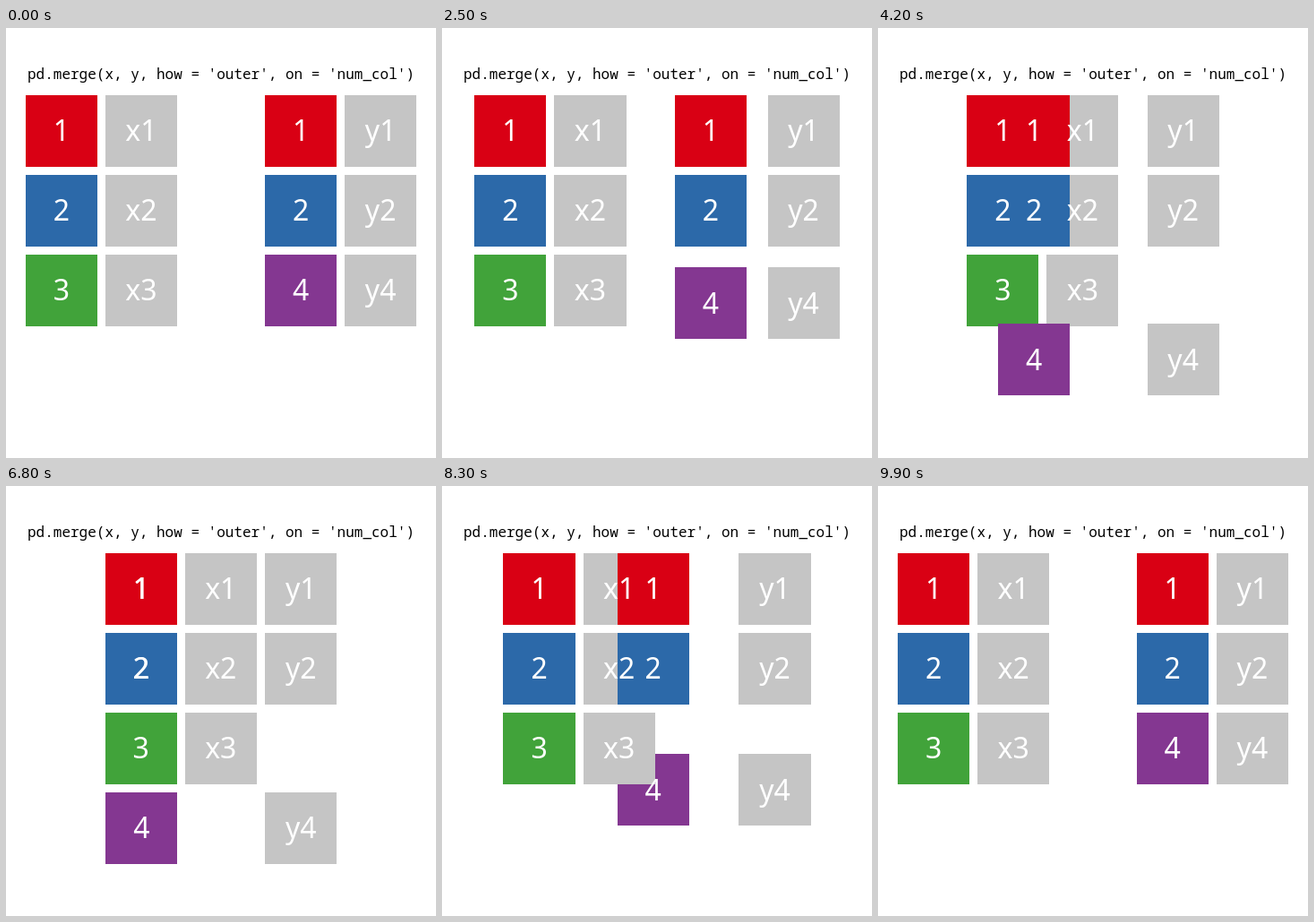
Recreate the animation shown at these times as an HTML page with a canvas. Size 480 px wide and 480 px high, loop 10 s.

```html
<!DOCTYPE html>
<html lang="en">
<head>
<meta charset="utf-8">
<title>Outer merge</title>
<style>
  html, body { margin: 0; width: 100%; height: 100%; overflow: hidden; background: #fff; }
  canvas { display: block; width: 480px; height: 480px; }
</style>
</head>
<body>
<canvas id="stage" width="480" height="480"></canvas>
<script>
const ctx = document.getElementById('stage').getContext('2d');

const LOOP = 10000, STEP = 100;
const PITCH = 89.06, HALF = 40.07;
const LEFT = 240 - 2 * PITCH, TOP = 114.61;   // centre of the first cell
const RED = '#d90014', BLUE = '#2c69a9', GREEN = '#41a33a', PURPLE = '#843791', GRAY = '#c5c5c5';

// Grid cell at rest, and the shift in cells once merged
const cell = (label, color, col, row, dx, dy = 0) => ({ label, color, col, row, dx, dy });

const purple = cell('4', PURPLE, 3, 2, -2, 1);
const others = [
  cell('x1', GRAY, 1, 0, 1), cell('x2', GRAY, 1, 1, 1), cell('x3', GRAY, 1, 2, 1),
  cell('y1', GRAY, 4, 0, -1), cell('y2', GRAY, 4, 1, -1), cell('y4', GRAY, 4, 2, -1, 1),
  cell('1', RED, 0, 0, 1), cell('2', BLUE, 0, 1, 1), cell('3', GREEN, 0, 2, 1),
  cell('1', RED, 3, 0, -2), cell('2', BLUE, 3, 1, -2)
];

const sine = t => (1 - Math.cos(Math.PI * Math.min(1, Math.max(0, t)))) / 2;

const centre = (c, m) => [
  LEFT + (c.col + c.dx * m) * PITCH,
  TOP + (c.row + c.dy * m) * PITCH
];

function drawTile(c, m) {
  const [x, y] = centre(c, m);
  const x0 = Math.round(x - HALF), y0 = Math.round(y - HALF);
  ctx.fillStyle = c.color;
  ctx.fillRect(x0, y0, Math.round(x + HALF) - x0, Math.round(y + HALF) - y0);
}

function drawLabel(c, m) {
  const [x, y] = centre(c, m);
  ctx.fillText(c.label, x, y + 11.4);
}

function draw(time) {
  const t = Math.floor(time / STEP) * STEP;
  const back = t >= 6700;
  const m = back ? 1 - sine((t - 6700) / 3300) : sine((t - 1600) / 3400);
  // The purple key passes over on the way in, under on the way out
  const cells = back ? [purple, ...others] : [...others, purple];

  ctx.fillStyle = '#fff';
  ctx.fillRect(0, 0, 480, 480);
  ctx.textAlign = 'center';

  ctx.fillStyle = '#000';
  ctx.font = '16px "Noto Sans Mono", "DejaVu Sans Mono", monospace';
  ctx.fillText("pd.merge(x, y, how = 'outer', on = 'num_col')", 240, 57);

  cells.forEach(c => drawTile(c, m));
  ctx.fillStyle = '#fff';
  ctx.font = '32px "Noto Sans", "Open Sans", sans-serif';
  cells.forEach(c => drawLabel(c, m));
}

const start = performance.now();
function tick() {
  draw((performance.now() - start) % LOOP);
  requestAnimationFrame(tick);
}
tick();
</script>
</body>
</html>
```
